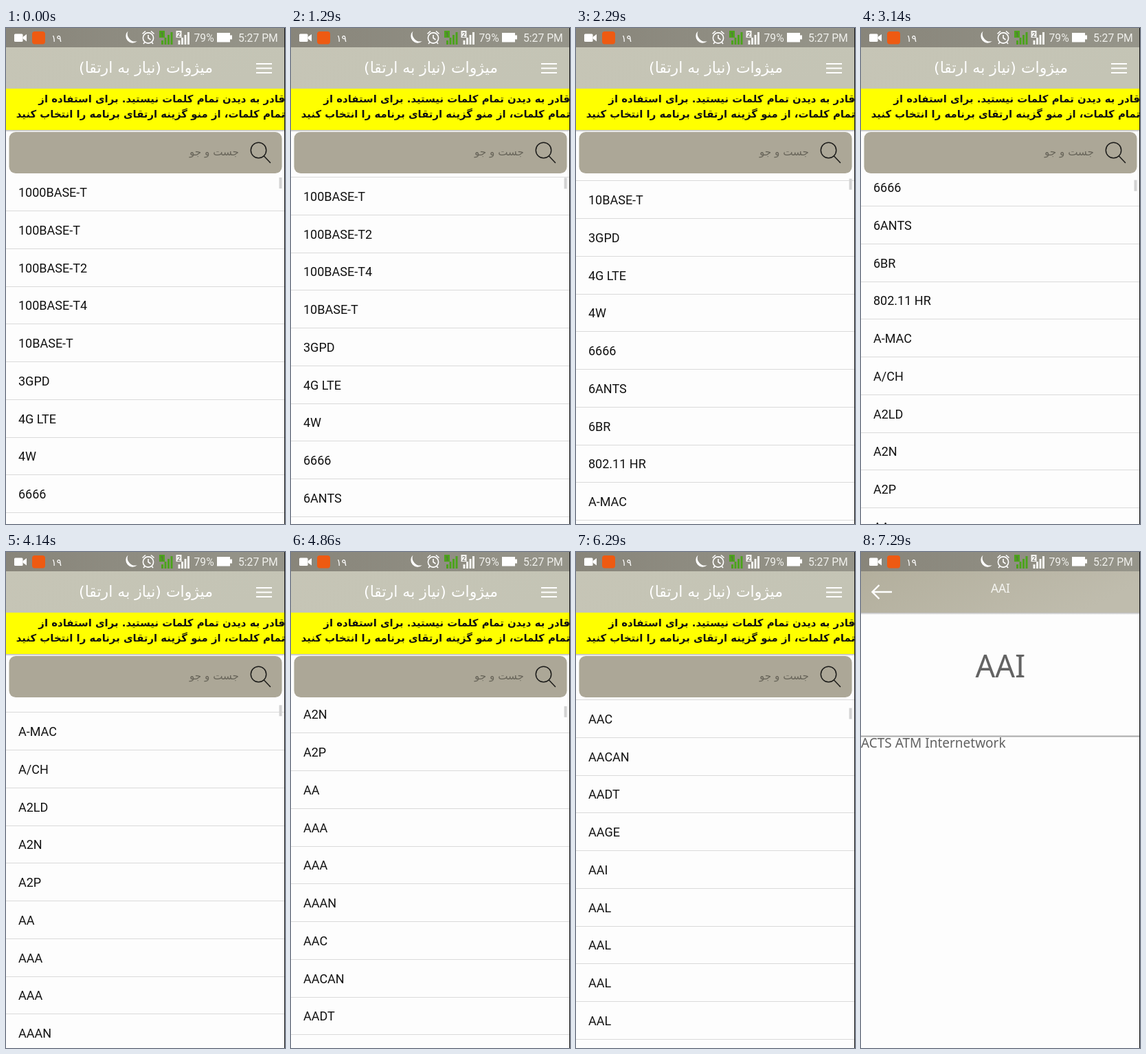
An HTML page for the animation above (8000 ms loop, 406x720 px).

```html
<!DOCTYPE html>
<html lang="fa">
<head>
<meta charset="utf-8">
<title>Acronym list</title>
<style>
  html, body { margin: 0; width: 100%; height: 100%; overflow: hidden; background: #fdfdfd; }
  svg { display: block; width: 100vw; height: 100vh; }
  .list text { font: 18px Roboto, sans-serif; fill: #111; }
  .list rect { fill: #dadada; }
  .fa { font-family: "DejaVu Sans", sans-serif; direction: rtl; }
  .clock { font: 15.7px Roboto, sans-serif; fill: #f0f0ec; }
  .detail text { font-family: "Noto Sans", sans-serif; }
  .icon { fill: none; stroke: #fff; }
</style>
</head>
<body>
<svg viewBox="0 0 406 720">
  <defs>
    <linearGradient id="status">
      <stop offset="0" stop-color="#88857a"/><stop offset="1" stop-color="#96958a"/>
    </linearGradient>
    <linearGradient id="head" x2="1" y2=".3">
      <stop offset="0" stop-color="#c6c5b6"/><stop offset="1" stop-color="#c4c4b5"/>
    </linearGradient>
    <linearGradient id="head2" x2="1" y2=".3">
      <stop offset="0" stop-color="#b3af9d"/><stop offset="1" stop-color="#bfbcad"/>
    </linearGradient>
    <linearGradient id="shade" x2="0" y2="1">
      <stop offset="0" stop-color="#000" stop-opacity=".28"/><stop offset="1" stop-color="#000" stop-opacity="0"/>
    </linearGradient>
  </defs>

  <rect width="406" height="720" fill="#fdfdfd"/>
  <g id="rows" class="list"></g>
  <rect id="bar" x="397.5" width="4" height="16" fill="#d2d2d2"/>
  <rect y="147" width="406" height="65" fill="#fdfdfd"/>

  <rect y="28" width="406" height="60" fill="url(#head)"/>
  <text class="fa" x="203.5" y="65" font-size="22" fill="#fff" text-anchor="middle">میژوات (نیاز به ارتقا)</text>
  <path class="icon" d="M364 52h23M364 58.5h23M364 65h23" stroke-width="2"/>

  <rect y="88" width="406" height="60" fill="#ff0"/>
  <rect y="148" width="406" height="3" fill="url(#shade)"/>
  <g class="fa" font-size="14.9" font-weight="bold" fill="#111">
    <text x="406" y="108">قادر به دیدن تمام کلمات نیستید. برای استفاده از</text>
    <text x="406" y="130">تمام کلمات، از منو گزینه ارتقای برنامه را انتخاب کنید</text>
  </g>

  <rect x="4.5" y="151" width="397" height="60" rx="9.5" fill="#aca797"/>
  <text class="fa" x="339" y="185" font-size="15.2" fill="#68655a">جست و جو</text>
  <g fill="none" stroke="#1c1c1a" stroke-width="1.5" stroke-linecap="round">
    <circle cx="367.5" cy="177.5" r="11.2"/>
    <path d="M375.5 186l9 9.5"/>
  </g>

  <g id="detail" class="detail">
    <rect y="28" width="406" height="692" fill="#fdfdfd"/>
    <rect y="28" width="406" height="60" fill="url(#head2)"/>
    <rect y="88" width="406" height="3" fill="url(#shade)"/>
    <path class="icon" d="M45 58H17M26.5 48L16.5 58l10 10" stroke-width="2.4"/>
    <text x="203" y="59" font-size="17.3" fill="#f4f4f0" text-anchor="middle">AAI</text>
    <text x="203" y="182" font-size="45" fill="#636363" text-anchor="middle">AAI</text>
    <rect y="266.5" width="405" height="2" fill="#aaa"/>
    <text x="0" y="283.5" font-size="19" fill="#616161">ACTS ATM Internetwork</text>
  </g>

  <rect width="406" height="28" fill="url(#status)"/>
  <g fill="#fff">
    <rect x="12" y="8.5" width="12.5" height="11.5" rx="1.5"/>
    <path d="M24.5 13l5.5-4v10.5l-5.5-4z"/>
    <rect x="38" y="5" width="19" height="18.5" rx="4" fill="#ee5a12"/>
    <text x="66" y="20" font-size="14" font-family="DejaVu Sans, sans-serif">۱۹</text>
    <path d="M177.5 4.5a9.6 9.6 0 1 0 13.5 14.5a11 11 0 0 1-13.5-14.5z"/>
    <g class="icon" stroke-width="1.6">
      <circle cx="207" cy="14.5" r="7.6"/>
      <path d="M207 10v4.500l3.500 2.500M198.500 8.500l4.500-4M215.500 8.500l-4.500-4M202 20.500l-2 2.500M212 20.500l2 2.500"/>
    </g>
    <g id="signals"></g>
    <path d="M307 7h19v3.5h3v6h-3V20.5h-19z"/>
  </g>
  <text class="clock" x="273.5" y="20">79%</text>
  <text class="clock" x="338" y="20">5:27 PM</text>
  <rect x="405" width="1" height="720" fill="#111"/>
</svg>
<script>
  const LOOP = 8000, FPS = 7, PITCH = 54.75;
  const words = ('1000BASE-T,100BASE-T,100BASE-T2,100BASE-T4,10BASE-T,3GPD,4G LTE,4W,6666,6ANTS,6BR,' +
    '802.11 HR,A-MAC,A/CH,A2LD,A2N,A2P,AA,AAA,AAA,AAAN,AAC,AACAN,AADT,AAGE,AAI,AAL,AAL,AAL,AAL').split(',');

  // Each fling: first step, number of steps, resting offset, easing power.
  const flings = [
    [9, 8, 208, 2],
    [18, 8, 483.8, 2],
    [28, 8, 829.4, 2],
    [38, 7, 1145.75, 2.03]
  ];

  const get = id => document.getElementById(id);
  const rows = get('rows'), bar = get('bar'), detail = get('detail');

  rows.innerHTML = words.map((word, i) => {
    const y = Math.round(i * PITCH);
    return `<text x="18" y="${y + 245}">${word}</text><rect y="${y + 265}" width="405" height="1"/>`;
  }).join('');

  function signal(x, label, color) {
    const bars = [6, 10, 14, 18].map((h, i) =>
      `<rect x="${x + 3 + i * 4.5}" y="${24 - h}" width="3" height="${h}"/>`).join('');
    return `<g fill="${color}">${bars}<rect x="${x}" y="4" width="8" height="10"/></g>` +
      `<text x="${x + 4}" y="12.5" font-size="9" font-family="Roboto, sans-serif" text-anchor="middle" fill="#5c5b52">${label}</text>`;
  }
  get('signals').innerHTML = signal(223, 1, '#4ca31c') + signal(247.5, 2, '#f6f6f2');

  const clamp = v => Math.max(0, Math.min(1, v));

  function scrollAt(step) {
    let offset = 0;
    for (const [first, count, rest, power] of flings) {
      const p = clamp((step - first + 1) / count);
      offset += (rest - offset) * (1 - Math.pow(1 - p, power));
    }
    return offset;
  }

  function draw(time) {
    // The picture advances in whole steps, seven a second.
    const step = Math.floor((time % LOOP + 5) * FPS / 1000) % (LOOP * FPS / 1000);
    const offset = scrollAt(step);
    rows.setAttribute('transform', `translate(0 ${-Math.round(offset)})`);
    bar.setAttribute('y', 217 + offset * 0.0083);
    detail.setAttribute('opacity', clamp((step - 46) / 3));
  }

  const start = performance.now();
  function tick() {
    draw(performance.now() - start);
    requestAnimationFrame(tick);
  }
  tick();
</script>
</body>
</html>
```
